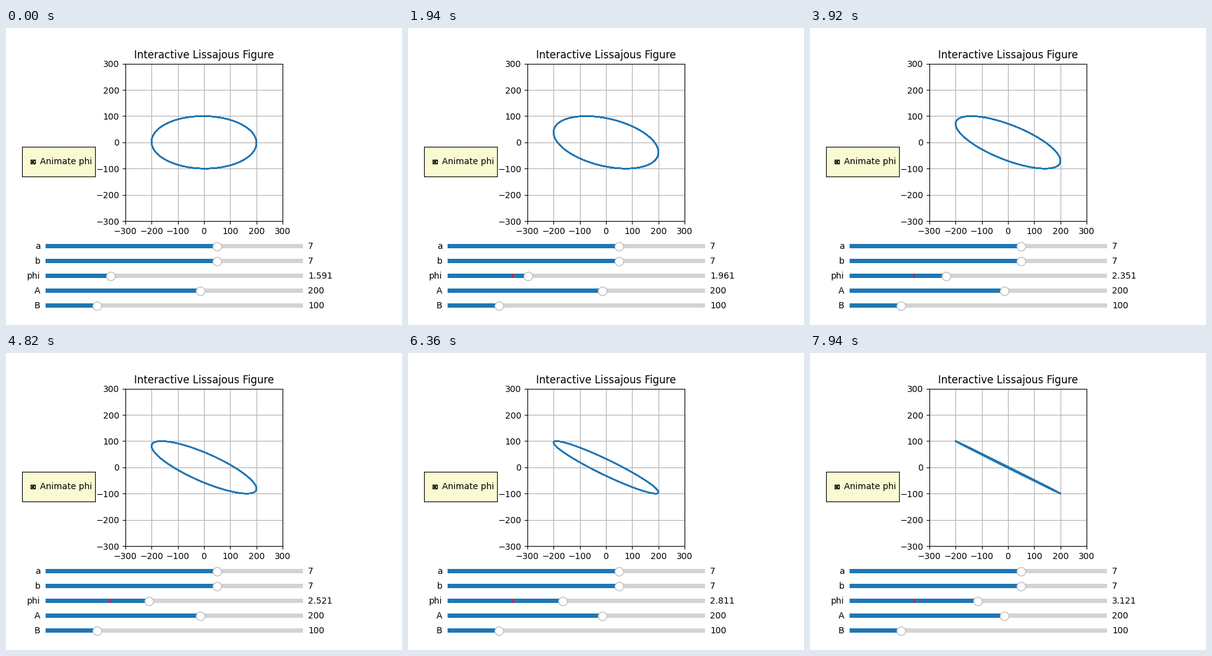
Animation of 640x480 px, one loop 8 s. Source, as a matplotlib script:

```python
import numpy as np
import matplotlib.pyplot as plt
from matplotlib.animation import FuncAnimation
from matplotlib.widgets import CheckButtons, Slider

TICK = 20                # ms per animation frame
LOOP = 8000              # ms
HOLDS = [1, 5, 1, 5, 1]  # uneven timer: ticks each phi value stays, repeating
PHI_STEP = 0.01
PHI_START = np.pi / 2 + 2 * PHI_STEP

FRAMES = LOOP // TICK
STEPS = np.repeat(np.arange(FRAMES), np.resize(HOLDS, FRAMES))[:FRAMES]

fig = plt.figure(figsize=(6.4, 4.8), dpi=100)

ax = fig.add_axes([0.1, 0.35, 0.8, 0.53])
ax.set_aspect("equal")
ax.set(xlim=(-300, 300), ylim=(-300, 300))
ax.set_xticks(range(-300, 301, 100))
ax.set_yticks(range(-300, 301, 100))
ax.set_title("Interactive Lissajous Figure")
ax.grid(True)
curve, = ax.plot([], [])


def add_slider(label, bottom, low, high, value, fmt="%d"):
    slot = fig.add_axes([0.1, bottom, 0.65, 0.03])
    slider = Slider(slot, label, low, high, valinit=value, valfmt=fmt)
    slider.drawon = False
    return slider


a = add_slider("a", 0.25, 1, 10, 7)
b = add_slider("b", 0.20, 1, 10, 7)
phi = add_slider("phi", 0.15, 0, 2 * np.pi, np.pi / 2, "%1.3f")
A = add_slider("A", 0.10, 50, 300, 200)
B = add_slider("B", 0.05, 50, 300, 100)

check_ax = fig.add_axes([0.04, 0.5, 0.185, 0.1], facecolor="lightgoldenrodyellow")
check = CheckButtons(check_ax, ["Animate phi"], [True])

t = np.linspace(0, 2 * np.pi, 1000)


def update(frame):
    phi.set_val(PHI_START + PHI_STEP * STEPS[frame])
    curve.set_data(A.val * np.sin(a.val * t + phi.val), B.val * np.sin(b.val * t))
    return curve,


def reset():
    return update(0)


anim = FuncAnimation(fig, update, frames=FRAMES, init_func=reset,
                     interval=TICK, repeat=True, repeat_delay=0, blit=False)
plt.show()
```
